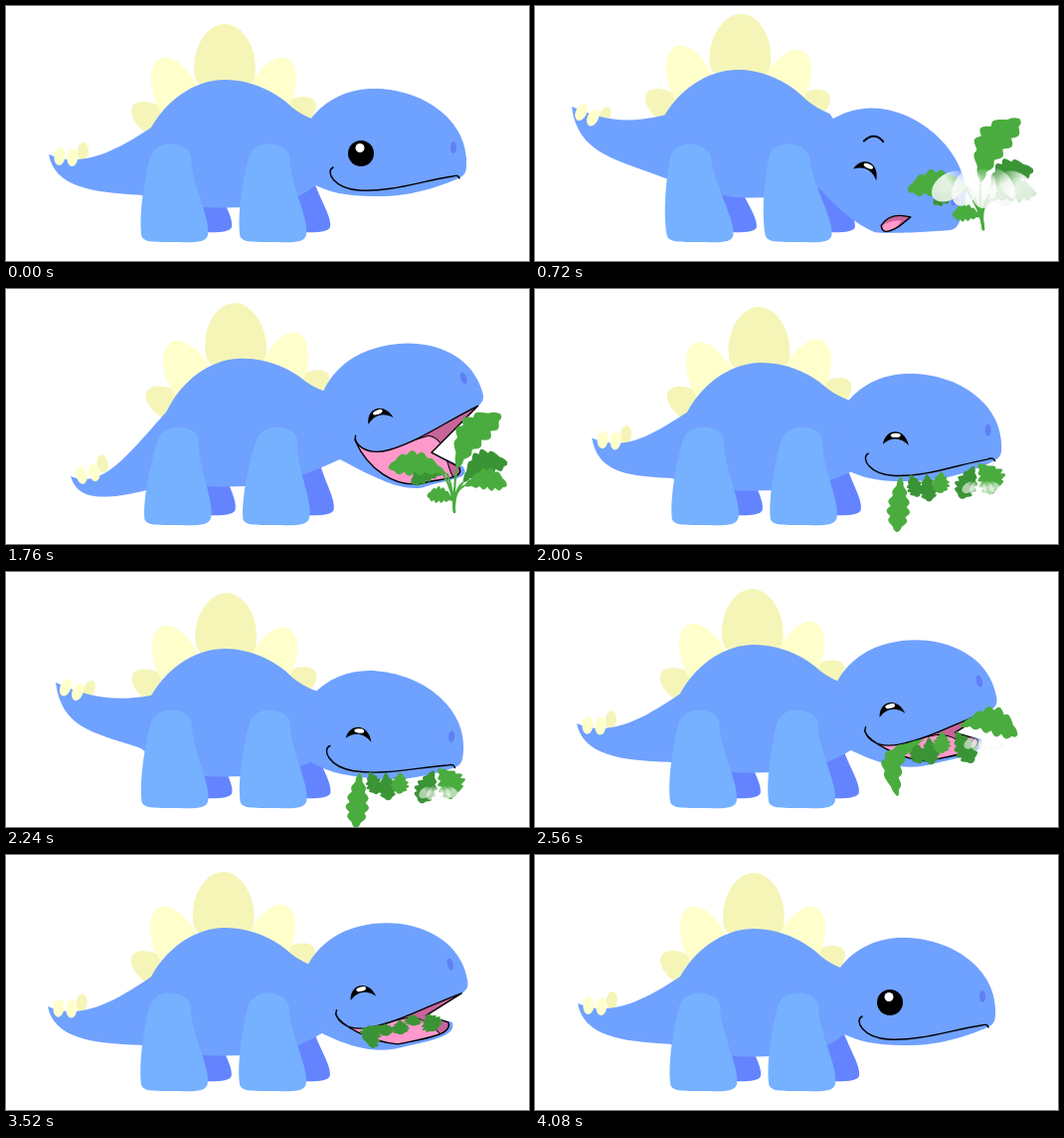
An HTML page with a canvas for the animation above (4.32 s loop, 526 px wide and 256 px high).

```html
<!DOCTYPE html>
<html lang="en">
<head>
<meta charset="utf-8">
<title>Hungry little dinosaur</title>
<style>
html, body { margin: 0; width: 100%; height: 100%; overflow: hidden; background: #fff; }
canvas { display: block; }
</style>
</head>
<body>
<canvas id="stage" width="526" height="256"></canvas>
<script>
const c = document.getElementById('stage').getContext('2d');
const LOOP = 4320, STEP = 80;
const SKIN = '#6fa1ff', LEG = '#75b1ff', FAR = '#6484ff';
const CREAM = '#ffffcc', SAND = '#f5f5b8';
const GREEN = '#4aac3e', MOSS = '#3a9436';

// hump x, y, tilt; tail x, y; eye x, y; head tilt; jaw opening; small mouth
const stand = [220, 74, 0, 43, 149, 357, 148, 0, 0, 0];
const sniff = [206, 64, 2, 37, 101, 334, 164, 23, 0, 1];
const bow   = [192, 66, 2, 10, 88, 316, 169, 23, 0, 1];
const ready = [218, 75, 0, 40, 140, 352, 148, -4, 0, 0];
const gape  = [225, 74, -3, 52, 168, 360, 137, -12, .7, 0];
const bite  = [232, 70, -4, 65, 188, 375, 127, -20, 2, 0];
const snap  = [229, 72, -3, 62, 175, 368, 142, -6, 0, 0];
const tug   = [221, 77, 1, 50, 111, 355, 163, 5, 0, 0];
const open  = [219, 73, -1, 42, 152, 358, 138, -14, 1, 0];
const shut  = [219, 73, -1, 42, 152, 356, 147, -2, 0, 0];
const gulp  = [219, 73, -1, 42, 152, 351, 147, -2, 0, 0];

// held from, held until, pose
const keys = [
  [0, 400, stand], [720, 720, sniff], [960, 1360, bow], [1440, 1520, ready],
  [1600, 1680, gape], [1760, 1760, bite], [1840, 1840, snap], [2240, 2240, tug],
  [2560, 2720, open], [2800, 2960, shut], [3040, 3200, open], [3280, 3440, gulp],
  [3520, 3680, open], [3840, 3840, shut], [4080, LOOP, stand]
];

const clamp = v => Math.max(0, Math.min(1, v));
const rad = d => d * Math.PI / 180;

function poseAt(t) {
  const i = keys.findIndex(k => t <= k[1]), [start, , to] = keys[i];
  if (t >= start) return to;
  const [, end, from] = keys[i - 1], u = (t - end) / (start - end);
  return from.map((v, n) => v + (to[n] - v) * u);
}

function turn(x, y, deg) {
  const a = rad(deg);
  return [x * Math.cos(a) - y * Math.sin(a), x * Math.sin(a) + y * Math.cos(a)];
}

function at(x, y, deg, draw) {
  c.save();
  c.translate(x, y);
  c.rotate(rad(deg));
  draw();
  c.restore();
}

function fill(d, color) {
  c.fillStyle = color;
  c.fill(new Path2D(d));
}

function line(d, width = 1.4, color = '#000') {
  c.strokeStyle = color;
  c.lineWidth = width;
  c.stroke(new Path2D(d));
}

function oval(x, y, rx, ry, color) {
  c.fillStyle = color;
  c.beginPath();
  c.ellipse(x, y, rx, ry, 0, 0, 7);
  c.fill();
}

function egg(x, y, w, h, deg, color) {
  at(x, y, deg, () => fill(`M${-w},${-.1 * h} C${-1.1 * w},${-.55 * h} ${-.6 * w},${-h} 0,${-h}
    C${.6 * w},${-h} ${1.1 * w},${-.55 * h} ${w},${-.1 * h} C${w},${.3 * h} ${-w},${.3 * h} ${-w},${-.1 * h}Z`, color));
}

function leaf(x, y, len, deg, wide, color, bend = 0) {
  at(x, y, deg, () => {
    c.beginPath();
    for (let i = 0; i <= 80; i++) {
      const u = i / 40, t = u < 1 ? u : 2 - u;
      const lobe = .72 + .35 * Math.abs(Math.sin(5.5 * Math.PI * t));
      const half = wide * Math.max(0, Math.sin(Math.PI * t ** 1.4)) ** .7 * lobe;
      c.lineTo(len * t, (u < 1 ? -half : half) + bend * len * Math.sin(Math.PI * t));
    }
    c.fillStyle = color;
    c.fill();
  });
}

function legs(dx, far) {
  for (const x of [0, 99]) {
    c.save();
    // feet stay almost planted while the hips follow the body
    const low = .22 * dx, high = .7 * dx, skew = (low - high) / 97;
    c.transform(1, 0, skew, 1, x + high - skew * 140, 0);
    if (far) fill('M180,172 L210,174 C217,195 229,212 227,222 C224,229 205,227 190,227Z', FAR);
    else fill(`M136,228 C134,205 140,170 145,152 C150,134 180,135 186,150
      C187,182 206,212 203,230 C201,239 185,237 167,237 C145,237 136,237 136,228Z`, LEG);
    c.restore();
  }
}

function spikes(hx, hy, tilt) {
  at(hx, hy, tilt, () => {
    egg(-64, 45, 15, 34, -57, SAND);
    egg(62, 40, 15, 34, 57, SAND);
    egg(-43, 26, 22, 52, -25, CREAM);
    egg(41, 26, 22, 52, 25, CREAM);
    egg(0, 0, 30.5, 56, 0, SAND);
  });
}

function body([hx, hy, tilt, tx, ty, ex, ey, nod, o]) {
  const p = (x, y) => {
    const q = turn(x, y, tilt);
    return [hx + q[0], hy + q[1]];
  };
  const b = p(-74, 48), ux = 135 + .2 * (hx - 220), uy = 139 + .34 * ty, belly = hy + 128;
  const chest = turn(-46 - 3 * o, 32 - 2 * o, nod), drop = uy - ty;
  const lean = 5 + (149 - ty) * .42;
  const thorn = (x, y, color) => at(tx, ty, lean, () => oval(x, y, 5.5, 9, color));
  thorn(34, -6, SAND);
  fill(`M${tx},${ty} C${tx + 32},${ty + 14} ${b[0] - 38},${b[1] + 13 + .45 * (ty - b[1])} ${b}
    C${p(-55, 15)} ${p(-25, 0)} ${p(0, 0)} C${p(30, 0)} ${p(55, 15)} ${p(68, 28)}
    Q${p(78, 36)} ${p(92, 41)} L${ex},${ey} L${ex + chest[0]},${ey + chest[1]}
    Q295,${belly - 8} 270,${belly - 3} Q235,${belly + 2} 200,${belly}
    Q165,${belly - 4} ${ux},${uy} C${ux - 50},${uy + 20 - .55 * drop} ${tx + 6},${ty + 12 + .5 * drop} ${tx},${ty}Z`, SKIN);
  thorn(11, 1, CREAM);
  thorn(24, 1, CREAM);
}

function eye(happy) {
  if (!happy) {
    oval(0, 0, 13, 13, '#000');
    oval(-1, -5.5, 4.5, 4.5, '#fff');
    return;
  }
  fill('M-13,5 C-10,-11 9,-12 13,7 C5,-2 -5,-2 -13,5Z', '#000');
  oval(0, -3.5, 5, 2.2, '#fff');
}

function head([, , , , , ex, ey, nod, o, s], happy) {
  const jx = 98 - 19 * o, jy = 25 + 26 * o, hinge = `${77 - 20 * o},${23 + 15 * o}`;
  const low = 43 + 20 * o + 12 * s;
  at(ex, ey, nod, () => {
    fill(`M-51,-34 C-35,-55 -12,-65 13,-65 C60,-65 104,-36 106,5 C106,16 107,21 98,25
      L${hinge} L${jx + Math.min(o, 1) * 2},${jy} C${jx + 3 * o},${jy + 16 * Math.min(o, 1)} ${60 - 8 * o - 8 * s},${low - 6 * s}
      ${22 - 3 * o + 10 * s},${low} C${-5 + 8 * s},${low - 2 * o} -25,${42 + 8 * o} ${-46 - 3 * o},${32 - 2 * o}Z`, SKIN);
    oval(93, -6, 3, 6, '#5f80f5');
    eye(happy);
    if (s > .4) {
      const pout = 'M59,27 Q38,30 35,46 Q40,57 52,40Z';
      line('M-14,-25 Q-8,-38 4,-32', 2);
      fill(pout, '#c8649a');
      fill('M52,34 Q40,38 36,47 Q41,55 50,42Z', '#ff99cc');
      line(pout);
    } else if (o > .05) {
      const lip = 'M-29,11 C-34,17 -27,34 -2,36 C30,38 60,29 97,25';
      const mouth = `${lip} L${hinge} L${jx - 2},${jy - 1}
        C${jx},${jy + 13} ${55 - 8 * o},${39 + 21 * o} ${25 - 3 * o},${39 + 20 * o}
        C${-5 * o},${25 + 25 * o} -29,${6 + 20 * o} -31,15Z`;
      c.save();
      c.clip(new Path2D(mouth));
      fill(mouth, '#c8649a');
      const tongue = `M-45,0 L0,34 L40,36 C58,${36 + 5 * o} ${80 - 18 * o},${34 + 18 * o} ${86 - 18 * o},${38 + 25 * o}`;
      fill(tongue + ' L60,130 L-45,130Z', '#ff99cc');
      line(tongue, 1);
      c.restore();
      line(mouth);
    } else line('M-28,14 C-36,18 -28,35 -2,37 C30,39 60,28 92,23 Q98,21 99,25');
  });
}

const plantLeaves = [
  [459, 195, 50, -25, 13, MOSS, -.2],
  [440, 186, 34, 165, 9, MOSS, .15],
  [453, 182, 72, -52, 16, GREEN, -.15],
  [460, 198, 44, -2, 11, GREEN, -.15],
  [444, 186, 60, 187, 12, GREEN, .12],
  [451, 212, 28, 190, 8, GREEN, .1]
];

function plant(t) {
  if (t < 560 || t > 1840) return;
  // springs up a little too far, then settles
  const over = t < 880 ? 1 : 0, grow = clamp((t - 480) / 240) * (1 + .07 * over);
  at(451, 224, -7 * over, () => {
    c.scale(grow, grow);
    c.translate(-451, -224);
    for (const l of plantLeaves) {
      line(`M451,224 Q450,203 ${l[0]},${l[1]}`, 2.2, GREEN);
      leaf(...l);
    }
  });
  c.globalAlpha = .85 * clamp((960 - t) / 240);
  puff(451, 183, 1);
  c.globalAlpha = 1;
}

function puff(x, y, size) {
  const g = c.createLinearGradient(0, y - 22 * size, 0, y + 20 * size);
  g.addColorStop(0, 'rgba(255,255,255,0)');
  g.addColorStop(.5, '#fff');
  g.addColorStop(1, '#f4f6f4');
  for (let i = -2; i <= 2; i++) {
    at(x + i * 17 * size, y - Math.abs(i) * size, i * -28, () => {
      c.translate(-x, -y);
      oval(x, y, 13 * size, 20 * size, g);
    });
  }
}

// anchor x, y on the head, length, direction, width, colour
const meal = [
  [78, 29, 36, 112, 11, MOSS], [30, 36, 28, 84, 9, MOSS], [14, 36, 24, 72, 8, MOSS], [45, 34, 22, 94, 9, GREEN]
];

function mouthful(t, [, , , , , ex, ey, nod, o]) {
  if (t < 1920 || t >= 3760) return;
  const left = t < 2800 ? 1 : t < 3040 ? .85 : t < 3280 ? .65 : .4;
  if (left < .5 && o < .5) return;
  const spot = (x, y) => {
    const q = turn(x, y, nod);
    return [ex + q[0], ey + q[1]];
  };
  const tint = color => left < .5 ? MOSS : color;
  for (const [x, y, len, deg, wide, color] of meal) {
    const slide = x > 60 ? o : 0;
    leaf(...spot(x - 20 * slide, y + 8 * slide), len * (.2 + .8 * left), deg - 50 * slide, wide, tint(color));
  }
  // the longest leaf droops over the lip when the jaw opens
  leaf(...spot(4 + 22 * o * left, 37), (57 + 7 * o) * left, 94 + 22 * o, 11, tint(GREEN), .3 * o);
  if (left < .8) return;
  leaf(...spot(82 - 20 * o, 27 + 6 * o), (34 + 26 * o) * left, 65 - 57 * o, 14, GREEN, -.18);
  if (t < 2640) {
    c.globalAlpha = .6;
    puff(...spot(85 - 3 * o, 52 + 4 * o), .38);
    c.globalAlpha = 1;
  }
}

function draw(now) {
  const t = Math.floor(now % LOOP / STEP) * STEP, pose = poseAt(t), dx = pose[0] - 220;
  c.fillStyle = '#fff';
  c.fillRect(0, 0, 526, 256);
  c.lineCap = c.lineJoin = 'round';
  legs(dx, true);
  spikes(...pose);
  body(pose);
  head(pose, t >= 640 && t < 3920);
  legs(dx, false);
  plant(t);
  mouthful(t, pose);
}

const begin = performance.now();
function tick() {
  draw(performance.now() - begin);
  requestAnimationFrame(tick);
}
tick();
</script>
</body>
</html>
```
